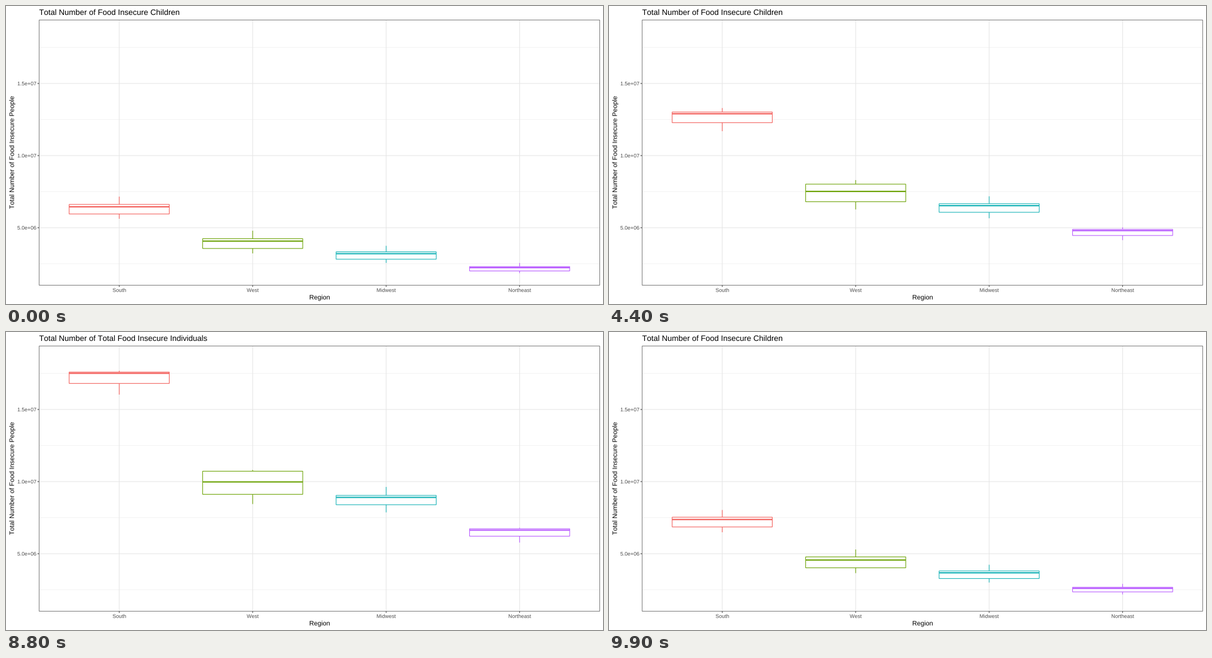
A matplotlib script that plays this animation: 1000 px wide and 500 px high, repeating every 10 s.

```python
import numpy as np
import matplotlib.pyplot as plt
from matplotlib.animation import FuncAnimation
from matplotlib.patches import PathPatch, Rectangle
from matplotlib.textpath import TextPath
from matplotlib.transforms import Affine2D

plt.rcParams["font.family"] = "Liberation Sans"
plt.rcParams["text.kerning_factor"] = 6  # plain advances, no pair kerning

WIDTH, HEIGHT, DPI = 1000, 500, 100
PX = 72 / DPI  # points per pixel
FRAMES, INTERVAL = 100, 100
HALF, HOLD, STEPS = 50, 37, 13
TITLE_STEP = 8

LEFT, RIGHT, TOP, BOTTOM = 55.5, 994.5, 23.5, 468.5
SLOT = (RIGHT - LEFT) / 4.2
BOX_WIDTH = 0.75 * SLOT
LINE, TICK = 1.07, 2.75
CAP = 0.717  # cap height relative to font size
GREY, DARK, GRID = "#4D4D4D", "#333333", "#E6E6E6"

REGIONS = {"South": "#F35E5A", "West": "#6BA204",
           "Midwest": "#17B3B7", "Northeast": "#B95CFF"}
TITLES = ["Total Number of Food Insecure Children",
          "Total Number of Total Food Insecure Individuals"]


def level(millions):
    """Stage height of a value given in millions."""
    return 493 - 24.2 * millions


def summary(median, reach, rise, tail, q1_gap):
    """Stage heights of max, upper quartile, median, lower quartile and min."""
    q3 = median + rise
    return level(np.column_stack(
        [q3 + tail, q3, median, median - q1_gap, median - reach]))


def children():
    median = np.array([6.45, 4.07, 3.2, 2.23])
    reach = np.array([0.83, 0.85, 0.64, 0.38])
    return summary(median, reach, 0.2 * reach, 0.65 * reach, 0.6 * reach)


def everyone():
    median = np.array([18.43, 10.47, 9.38, 7.0])
    reach = np.array([1.53, 1.59, 1.07, 0.9])
    rise = np.array([0.08, 0.79, 0.14, 0.1])
    tail = np.array([0.05, 0.05, 0.6, 0.05])
    return summary(median, reach, rise, tail, 0.46 * reach + 0.2 * rise)


STATES = [children(), everyone()]

fig = plt.figure(figsize=(WIDTH / DPI, HEIGHT / DPI), dpi=DPI, facecolor="white")
ax = fig.add_axes([0, 0, 1, 1])
ax.set_xlim(0, WIDTH)
ax.set_ylim(HEIGHT, 0)
ax.axis("off")


def line(xs, ys, color, width=LINE, z=1):
    return ax.plot(xs, ys, color=color, lw=width * PX, zorder=z,
                   solid_capstyle="butt", snap=False)[0]


def label(x, y, text, size, color="black", anchor=0.5, angle=0):
    """Text on baseline y; anchor 0, 0.5, 1 is left, centre, right."""
    path = TextPath((0, 0), text, size=size)
    shift = -anchor * path.get_extents().x1
    place = (Affine2D().translate(shift, 0).scale(1, -1)
             .rotate_deg(-angle).translate(x, y))
    return ax.add_patch(PathPatch(place.transform_path(path), fc=color,
                                  lw=0, zorder=7))


class Box:
    def __init__(self, center, color):
        left, right = center - BOX_WIDTH / 2, center + BOX_WIDTH / 2
        self.upper = line([center] * 2, [0, 0], color, z=3)
        self.lower = line([center] * 2, [0, 0], color, z=3)
        self.body = ax.add_patch(Rectangle(
            (left, 0), BOX_WIDTH, 1, fc="white", ec=color, lw=LINE * PX,
            zorder=4, snap=False, joinstyle="miter"))
        self.median = line([left, right], [0, 0], color, 2 * LINE, z=5)

    def place(self, high, q3, mid, q1, low):
        self.upper.set_ydata([high, q3])
        self.lower.set_ydata([q1, low])
        self.body.set_y(q3)
        self.body.set_height(q1 - q3)
        self.median.set_ydata([mid, mid])


# Horizontal grid: every second line is a labelled major one
for k in range(1, 8):
    y = level(2.5 * k)
    if k % 2:
        line([LEFT, RIGHT], [y, y], "#E9E9E9", LINE / 2)
    else:
        line([LEFT, RIGHT], [y, y], GRID)
        line([LEFT - TICK, LEFT], [y, y], DARK, z=6)
        label(LEFT - TICK - 2.2, y + 8.8 * CAP / 2, f"{2.5e6 * k:.1e}",
              8.8, GREY, anchor=1)

boxes = []
for k, (region, color) in enumerate(REGIONS.items()):
    x = LEFT + (0.6 + k) * SLOT
    line([x, x], [TOP, BOTTOM], GRID)
    line([x, x], [BOTTOM, BOTTOM + TICK], DARK, z=6)
    label(x, BOTTOM + TICK + 2.2 + 8.8 * CAP, region, 8.8, GREY)
    boxes.append(Box(x, color))

ax.add_patch(Rectangle((LEFT, TOP), RIGHT - LEFT, BOTTOM - TOP, fill=False,
                       ec="#7C7C7C", lw=PX, zorder=6, snap=False))
label((LEFT + RIGHT) / 2, 492.4, "Region", 11)
label(5.5 + 11 * CAP, (TOP + BOTTOM) / 2,
      "Total Number of Food Insecure People", 11, angle=90)
titles = [label(LEFT, 5.5 + 13.2 * CAP, text, 13.2, anchor=0)
          for text in TITLES]


def draw(frame):
    side, phase = divmod(frame, HALF)
    step = max(0, phase - HOLD)
    start, end = STATES[side], STATES[1 - side]
    for box, heights in zip(boxes, start + (end - start) * step / STEPS):
        box.place(*heights)
    shown = 1 - side if step >= TITLE_STEP else side
    for k, title in enumerate(titles):
        title.set_visible(k == shown)
    return titles


anim = FuncAnimation(fig, draw, frames=FRAMES, interval=INTERVAL,
                     repeat=True, repeat_delay=0, blit=False)
plt.show()
```
